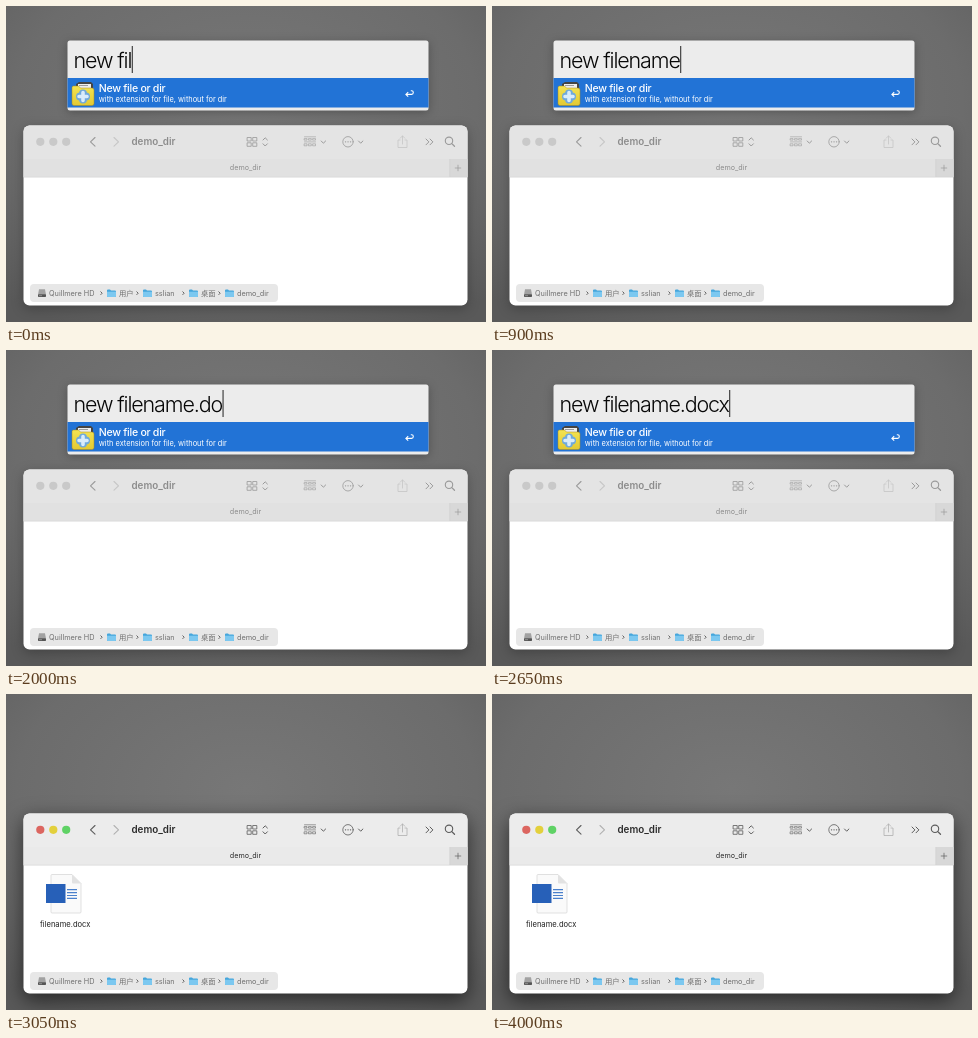
These frames come from a looping animation (480x316 px, 4.05 s). An HTML page:

```html
<!DOCTYPE html>
<html lang="en">
<meta charset="utf-8">
<title>New file demo</title>
<style>
  html, body { margin: 0; width: 100%; height: 100%; overflow: hidden; background: #6a6a6a; }
  svg { display: block; width: 100vw; height: 100vh; font-family: Inter, "Noto Sans CJK SC", "Noto Sans CJK", sans-serif; }
  #query { font-size: 21.5px; font-weight: 350; letter-spacing: -.053em; white-space: pre; }
  #launcher { filter: drop-shadow(0 2px 5px #0004); }
  #frame { filter: drop-shadow(0 3px 6px #0004); }
  .active #frame { filter: drop-shadow(0 6px 10px #0009); }
  #window { --bar: #e4e4e4; --tab: #e1e1e1; --ink: #9a9a9a; --title: #8c8c8c; --dim: #c6c6c6; }
  #window.active { --bar: #ececec; --tab: #eaeaea; --ink: #5c5c5c; --title: #2b2b2b; --dim: #b0b0b0; }
  .icon { fill: none; stroke: var(--ink); stroke-linecap: round; stroke-linejoin: round; }
  .dim { stroke: var(--dim); }
  .light { fill: #c9c9c9; }
  .active .light { fill: var(--on); }
  #path { font-size: 7.3px; fill: #707070; }
</style>
<svg viewBox="0 0 480 316">
  <defs>
    <radialGradient id="wall" cx=".5" cy=".3" r=".8">
      <stop stop-color="#777"/><stop offset=".6" stop-color="#6c6c6c"/><stop offset="1" stop-color="#595959"/>
    </radialGradient>
    <linearGradient id="yellow" x2="0" y2="1"><stop stop-color="#f3e352"/><stop offset="1" stop-color="#e3c932"/></linearGradient>
    <symbol id="folder" viewBox="0 0 10 9" width="10" height="9">
      <path d="M.5 1.800q0-1 1-1h2l1 1h4q1 0 1 1V7.500q0 .8-1 .8h-7q-1 0-1-.8z" fill="#45a6dc"/>
      <path d="M.5 3h9v4.500q0 .8-1 .8h-7q-1 0-1-.8z" fill="#7cc8f0"/>
    </symbol>
    <symbol id="disk" viewBox="0 0 9 9" width="9" height="9">
      <path d="M1.500.5h6l1 5.500h-8z" fill="#a2a2a2"/><rect x=".5" y="5.500" width="8" height="2.800" rx=".7" fill="#555"/>
      <path d="M1.500 7h3" stroke="#bbb" stroke-width=".6"/>
    </symbol>
    <clipPath id="launcherClip"><rect x="61.500" y="34.500" width="361" height="70" rx="2.500"/></clipPath>
    <clipPath id="windowClip"><rect x="17.500" y="119.500" width="444" height="180" rx="6"/></clipPath>
  </defs>
  <rect width="480" height="316" fill="url(#wall)"/>

  <g id="window">
    <rect id="frame" x="17.500" y="119.500" width="444" height="180" rx="6" fill="#fff"/>
    <g clip-path="url(#windowClip)">
      <path d="M17 119h445v34H17z" fill="var(--bar)"/>
      <path d="M17 153h445v18H17z" fill="var(--tab)"/>
      <path d="M444 153h18v18h-18z" fill="#d8d8d8"/>
      <path d="M17 171.200h445M443.700 153v18" stroke="#cfcfcf" stroke-width=".6"/>
    </g>
    <circle class="light" cx="34.300" cy="135.800" r="4.100" style="--on:#dc6660"/>
    <circle class="light" cx="47.300" cy="135.800" r="4.100" style="--on:#e3d03c"/>
    <circle class="light" cx="60.200" cy="135.800" r="4.100" style="--on:#5fd265"/>
    <g class="icon">
      <path d="M89 131.500l-4.500 4.300 4.500 4.300" stroke-width="1.100"/>
      <path class="dim" d="M108 131.500l4.500 4.300-4.500 4.300" stroke-width="1.100"/>
      <path d="M241.500 131.500h3.700v3.500h-3.700zm5.600 0h3.700v3.500h-3.700zm-5.600 5.300h3.700v3.500h-3.700zm5.600 0h3.700v3.500h-3.700z" stroke-width=".8"/>
      <path d="M257 134l2.200-2.200 2.200 2.200m-4.400 3.800l2.200 2.200 2.200-2.200"/>
      <path d="M298.500 130.800h11m-11 5.100h11" stroke-width=".6"/>
      <path d="M298.500 132.600h2.500v1.500h-2.500zm4.300 0h2.500v1.500h-2.500zm4.200 0h2.500v1.500h-2.500zm-8.500 5.200h2.500v2h-2.500zm4.300 0h2.500v2h-2.500zm4.200 0h2.500v2h-2.500z" stroke-width=".6"/>
      <path d="M315.200 135l2.200 2.200 2.200-2.200m32.900 0l2.200 2.200 2.200-2.200"/>
      <circle cx="342" cy="135.800" r="5.200" stroke-width=".8"/>
      <path d="M339.500 135.800h.1m2.400 0h.1m2.400 0h.1" stroke-width="1.300"/>
      <path class="dim" d="M394 134h-2v7.500h9V134h-2m-2.500 4v-8m-2.300 2.200l2.300-2.300 2.300 2.300" stroke-width=".8"/>
      <path d="M420 133l2.900 2.900-2.900 2.900m4-5.800l2.900 2.900-2.900 2.900"/>
      <circle cx="443" cy="134.800" r="3.700" stroke-width="1.100"/>
      <path d="M445.800 137.600l2.700 2.700" stroke-width="1.300"/>
      <path d="M449.200 162h5.600m-2.800-2.800v5.600" stroke-width=".7"/>
    </g>
    <text x="125.500" y="139.300" font-size="9.800" font-weight="600" fill="var(--title)">demo_dir</text>
    <text x="239.500" y="164.300" font-size="7.200" text-anchor="middle" fill="var(--title)">demo_dir</text>
    <rect x="24" y="278" width="248" height="18" rx="4" fill="#e7e7e7"/>
    <g id="path"></g>
    <g id="file">
      <path d="M46 180.500h20l9 9V218q0 1-1 1H46q-1 0-1-1v-36.500q0-1 1-1z" fill="#fafafa" stroke="#d5d5d5" stroke-width=".7"/>
      <path d="M66 180.500v8q0 1 1 1h8z" fill="#e2e2e2"/>
      <path d="M61 195.700h10m-10 2.900h10m-10 2.900h10m-10 2.900h10" stroke="#4a80cc" stroke-width="1.200"/>
      <rect x="40" y="190" width="19.500" height="19" fill="#2760b8"/>
      <text x="59.200" y="232.800" font-size="7.600" text-anchor="middle" fill="#222">filename.docx</text>
    </g>
  </g>

  <g id="launcher">
    <g clip-path="url(#launcherClip)">
      <path d="M61 34h362v71H61z" fill="#ececec"/>
      <path d="M61 72h362v29.500H61z" fill="#2273d6"/>
    </g>
    <text id="query" x="67.500" y="61.500" fill="#080808"></text>
    <rect id="caret" y="40" width="1" height="27" fill="#222"/>
    <path d="M70 84v-6l3-2h12l2 2v6z" fill="#444"/>
    <path d="M72 82v-4h13v4z" fill="#eee"/>
    <path d="M73 79.500h9" stroke="#888" stroke-width=".8"/>
    <path d="M66 81.500q0-1.500 1.500-1.500h5l2 2H86q2 0 2 2v13.500q0 2-2 2H68q-2 0-2-2z" fill="url(#yellow)" stroke="#a8891c" stroke-width=".5"/>
    <g fill="none" stroke-linecap="round">
      <path d="M77 87.500v6m-3-3h6" stroke="#6fa9dc" stroke-width="8"/>
      <path d="M77 86.500v8m-4-4h8" stroke="#d9ecfb" stroke-width="3.600"/>
    </g>
    <g fill="#fff">
      <text x="92.800" y="86.300" font-size="10.600" font-weight="500" letter-spacing="-.28">New file or dir</text>
      <text x="92.800" y="96.300" font-size="7.400">with extension for file, without for dir</text>
    </g>
    <path d="M404.800 84.800h.8q1.700 0 1.700 1.800t-1.700 1.800H400m2.200-2.200l-2.300 2.200 2.300 2.200" fill="none" stroke="#fff" stroke-width="1.100"/>
  </g>
</svg>
<script>
  const $ = id => document.getElementById(id);
  const LOOP = 4050, CLOSE = 2700, FOCUS = 2750, FILE = 2900;
  const TEXT = "new filename.docx", START = 7;
  const keyTimes = [100, 200, 300, 400, 500, 1500, 1850, 2000, 2200, 2350];

  const crumbs = [[32, "Quillmere HD"], [101, "用户"], [137, "sslian"], [183, "桌面"], [219, "demo_dir"]];
  $("path").innerHTML = crumbs.map(([x, label], i) =>
    `<use href="#${i ? "folder" : "disk"}" x="${x - .5}" y="282.700"/><text x="${x + (i ? 12 : 11)}" y="289.800">${label}</text>` +
    (i ? `<path d="M${x - 6.500} 285.500l1.700 1.700-1.700 1.700" fill="none" stroke="#555" stroke-width=".9"/>` : "")
  ).join("");

  const show = (id, on) => $(id).style.display = on ? "" : "none";

  function draw(now) {
    const t = now % LOOP;
    show("launcher", t < CLOSE);
    show("file", t >= FILE);
    $("window").classList.toggle("active", t >= FOCUS);
    if (t < CLOSE) {
      const typed = TEXT.slice(0, START + keyTimes.filter(k => k <= t).length);
      if ($("query").textContent !== typed) $("query").textContent = typed;
      $("caret").setAttribute("x", 68 + $("query").getComputedTextLength());
    }
    requestAnimationFrame(draw);
  }
  draw(performance.now());
</script>
</html>
```
